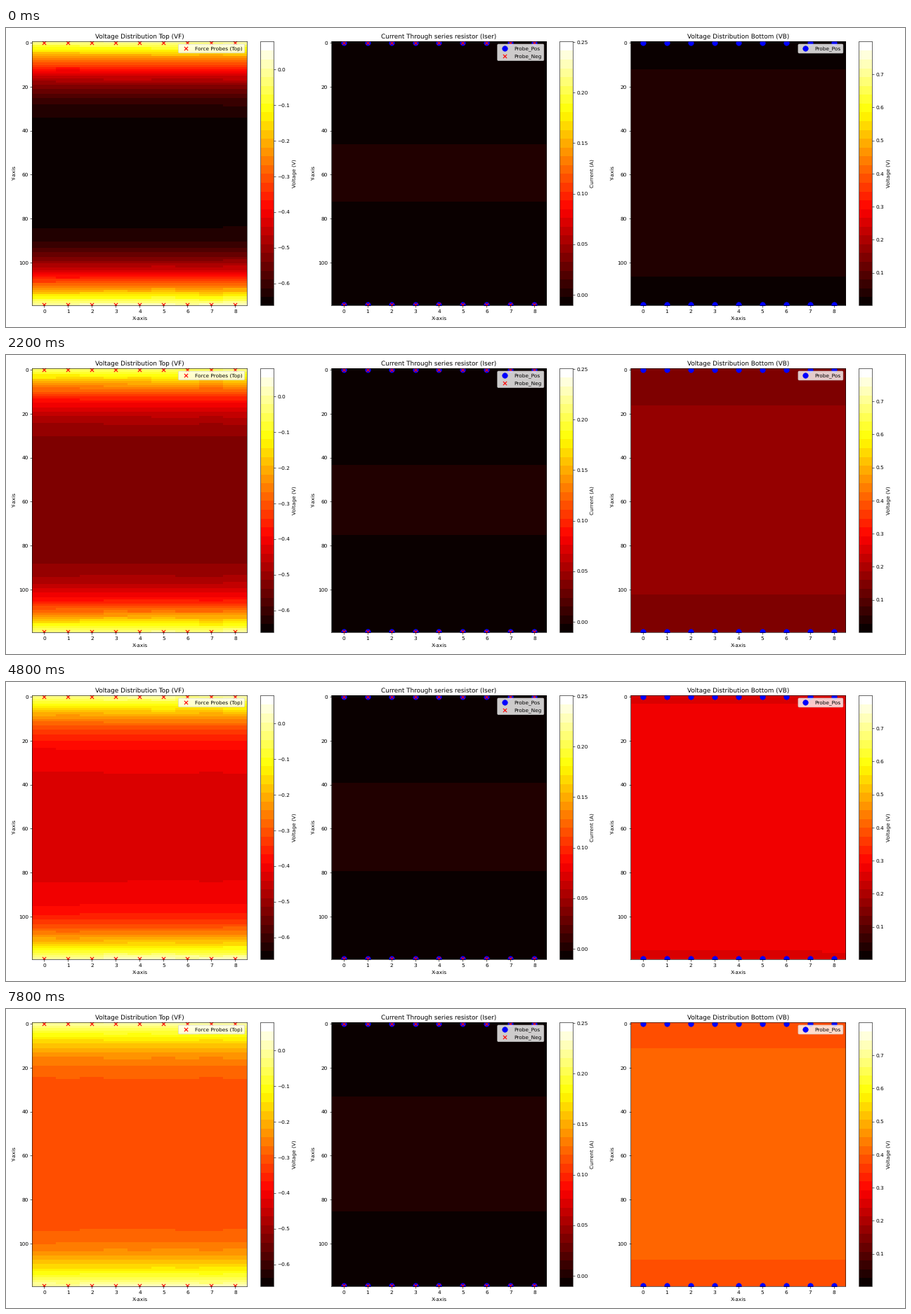
Recreate the animation shown at these times as a matplotlib script. Size 1280x427 px, loop 8 s.

```python
import numpy as np
import matplotlib.pyplot as plt
from matplotlib.animation import FuncAnimation

DPI = 1280 / 24
LAYOUT_DPI = 100
ROWS, COLS, LEVELS = 120, 9, 30
FRAMES, INTERVAL = 40, 200

rng = np.random.default_rng(7)
row = np.arange(ROWS)[:, None]
edge_dist = np.minimum(row, ROWS - 1 - row)
mid_dist = np.abs(row - (ROWS - 1) / 2)


def jitter(size):
    """Small uneven shift, in rows, of each column and cell."""
    return rng.normal(0, size, COLS) + rng.normal(0, 0.6 * size, (ROWS, COLS))


top_shift = jitter(0.17) + np.linspace(0.15, -0.2, COLS)
bottom_shift = jitter(0.14)

# Sweep in seconds; voltages are in colour levels, lengths in rows.
KEY_T = [0, 0.8, 2.2, 3.4, 4.2, 5.8, 7.8]
TOP_CENTER = [0.57, 2.57, 5.40, 6.89, 8.87, 11.60, 14.62]
TOP_DEPTH = [35.2, 35.0, 31.5, 30.0, 28.2, 29.0, 27.5]
TOP_SOFT = [6, 6, 7, 7, 7.4, 6, 5]
TOP_SLOPE = [0.146, 0.140, 0.143, 0.147, 0.150, 0.135, 0.128]
BOTTOM_CENTER = [1.256, 3.278, 6.176, 7.489, 9.474, 12.204, 15.276]
MID_HALF = [12.8, 14, 16, 18, 19, 22, 26]


def top_levels(t):
    center, depth, soft, slope = (
        np.interp(t, KEY_T, k)
        for k in (TOP_CENTER, TOP_DEPTH, TOP_SOFT, TOP_SLOPE))
    u = (depth - edge_dist - top_shift) / soft
    return center + (slope * soft * np.logaddexp(0, u)) ** 2


def mid_levels(t):
    level = 1 + 0.03 * (np.interp(t, KEY_T, MID_HALF) - mid_dist)
    return np.repeat(np.maximum(level, 0.1), COLS, axis=1)


def bottom_levels(t):
    u = np.maximum(0, 1 - (edge_dist + bottom_shift) / 36)
    return np.interp(t, KEY_T, BOTTOM_CENTER) - 0.6 * u ** 2


class Panel:
    def __init__(self, ax, title, label, vmin, vmax, ticks, levels):
        self.ax, self.levels = ax, levels
        self.vmin, self.step = vmin, (vmax - vmin) / LEVELS
        self.im = ax.imshow(
            self.data(0), cmap=plt.get_cmap("hot", LEVELS), vmin=vmin,
            vmax=vmax, aspect="auto", interpolation="nearest")
        ax.set(title=title, xlabel="X-axis", ylabel="Y-axis",
               xticks=range(COLS), yticks=range(0, ROWS, 20))
        fig.colorbar(self.im, ax=ax, ticks=ticks, label=label)

    def data(self, t):
        return self.vmin + self.step * self.levels(t)

    def probes(self, label, color, marker, size):
        x = np.tile(np.arange(COLS), 2)
        y = np.repeat([0, ROWS - 1], COLS)
        self.ax.scatter(x, y, s=size, c=color, marker=marker, label=label)
        self.ax.set(xlim=(-0.5, COLS - 0.5), ylim=(ROWS - 0.5, -0.5))


# Unsnapped lines and unhinted text keep fine details at true positions.
plt.rcParams.update({"font.family": "DejaVu Sans", "path.snap": False,
                     "text.hinting": "none"})
fig, axes = plt.subplots(1, 3, figsize=(24, 8.0063), dpi=DPI,
                         facecolor="white")

top = Panel(axes[0], "Voltage Distribution Top (VF)", "Voltage (V)",
            -0.6624, 0.0777, np.arange(-6, 1) / 10, top_levels)
mid = Panel(axes[1], "Current Through series resistor (Iser)", "Current (A)",
            -0.0107, 0.2504, np.arange(6) / 20, mid_levels)
bottom = Panel(axes[2], "Voltage Distribution Bottom (VB)", "Voltage (V)",
               0.001, 0.799, np.arange(1, 8) / 10, bottom_levels)
panels = [top, mid, bottom]

top.probes("Force Probes (Top)", "red", "x", 50)
mid.probes("Probe_Pos", "blue", "o", 100)
mid.probes("Probe_Neg", "red", "x", 50)
bottom.probes("Probe_Pos", "blue", "o", 100)
for p in panels:
    p.ax.legend(loc="upper right")

# Measure text at a finer resolution for an accurate layout.
fig.set_dpi(LAYOUT_DPI)
fig.tight_layout()
fig.set_dpi(DPI)


def update(i):
    t = i * INTERVAL / 1000
    for p in panels:
        p.im.set_data(p.data(t))
    return [p.im for p in panels]


anim = FuncAnimation(fig, update, frames=FRAMES, interval=INTERVAL,
                     repeat=True, repeat_delay=0)
plt.show()
```
